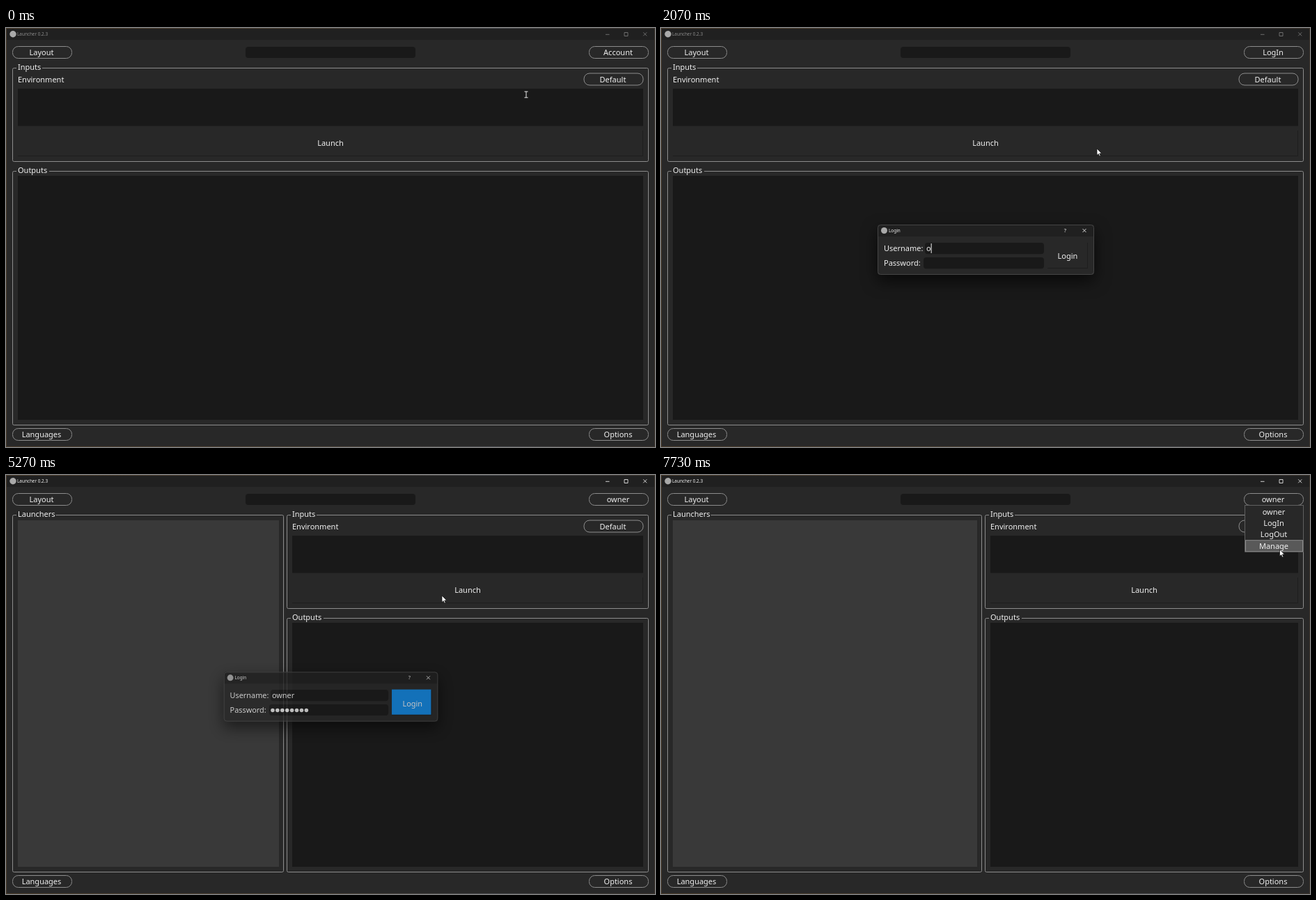
Animation of 932x601 px, one loop 8 s. Source, as an HTML page:

```html
<!DOCTYPE html>
<html lang="en">
<head>
<meta charset="utf-8">
<title>Launcher</title>
<style>
  html, body { margin: 0; height: 100%; overflow: hidden; background: #282828; }
  svg { display: block; width: 100vw; height: 100vh; cursor: none; }
  text { font: 11px "Noto Sans", "Open Sans", sans-serif; fill: #f0f0f0; }
  .mid { text-anchor: middle; }
  .small { font-size: 6.4px; }
  .bg { fill: #282828; }
  .bar { fill: #202020; }
  .field { fill: #191919; }
  .edge { fill: #1e1e1e; }
  .frame { fill: none; stroke: #8c8c8c; }
  .button { fill: #282828; stroke: #8c8c8c; }
  .glyph { fill: none; stroke: #e6e6e6; stroke-width: .9; }
  .inactive text { fill: #8a8a8a; }
  .inactive .glyph { stroke: #777; }
  .logo { fill: #a9a9a9; }
  #shadow { filter: drop-shadow(0 9px 11px rgba(0, 0, 0, .65)); }
</style>
</head>
<body>
<svg viewBox="0 0 932 601" preserveAspectRatio="none">
  <defs>
    <linearGradient id="desktop" x2="1">
      <stop offset="0" stop-color="#4a3c2c"/>
      <stop offset=".45" stop-color="#4e4336"/>
      <stop offset=".75" stop-color="#4a4c50"/>
      <stop offset="1" stop-color="#3a332c"/>
    </linearGradient>
  </defs>

  <rect class="bg" width="932" height="601"/>
  <rect class="bar" width="932" height="17"/>
  <rect x=".5" y=".5" width="931" height="600" fill="none" stroke="url(#desktop)"/>
  <g id="titlebar">
    <circle class="logo" cx="10" cy="8.7" r="4.7"/>
    <text class="small" x="16" y="11.2">Launcher 0.2.3</text>
    <path class="glyph" d="M861 9.3h5.5M888 6.5h5v5h-5zM915.2 6.3l5 5m0-5l-5 5"/>
  </g>

  <rect class="field" x="344" y="27" width="244" height="16" rx="4"/>
  <g id="buttons"></g>

  <g id="launchers">
    <rect class="frame" id="leftFrame" x="9.5" y="57.5" height="512" rx="2"/>
    <rect class="bg" x="15" y="52" width="56.5" height="10"/>
    <text x="17" y="60">Launchers</text>
    <rect id="leftList" x="17" y="65" height="497" fill="#393939"/>
  </g>

  <rect class="frame" id="inFrame" y="57.5" height="134" rx="2"/>
  <rect class="frame" id="outFrame" y="205.5" height="364" rx="2"/>
  <g id="headings">
    <rect class="bg" x="15" y="52" width="37" height="10"/>
    <text x="17" y="60">Inputs</text>
    <text x="17" y="78">Environment</text>
    <rect class="bg" x="15" y="200" width="47" height="10"/>
    <text x="17" y="207.5">Outputs</text>
  </g>
  <rect class="field" id="envBox" y="87" height="53.5"/>
  <rect class="edge" id="launchEdge" y="147" height="37"/>
  <rect class="bg" id="launchFace" y="146" height="37"/>
  <text class="mid" id="launchText" y="169">Launch</text>
  <rect class="field" id="outBox" y="212" height="350"/>
  <g id="defaultButton"></g>
  <text class="mid" id="loading" x="466" y="587.3">Loading.</text>

  <g id="menu">
    <rect class="bg" id="menuBox" x="838.5" y="43.5" width="84" stroke="#606060"/>
    <rect id="menuRow" x="839.5" width="82" height="16" fill="#595959" stroke="#8a8a8a"/>
    <g id="menuItems"></g>
  </g>

  <g id="dialog">
    <g id="shadow"><rect class="bg" x="311" y="282" width="311" height="72" rx="4"/></g>
    <path class="bar" d="M311 299v-13q0-4 4-4h303q4 0 4 4v13z"/>
    <rect x="311.5" y="282.5" width="310" height="71" rx="4" fill="none" stroke="#454545"/>
    <circle class="logo" cx="320.5" cy="290.5" r="4.5"/>
    <text class="small" x="327" y="293">Login</text>
    <text class="small mid" x="580.5" y="293.2" style="font-size:7.5px">?</text>
    <path class="glyph" d="M605.5 288l5 5m0-5l-5 5"/>
    <text x="320" y="320.2">Username:</text>
    <text x="320" y="341.3">Password:</text>
    <rect class="field" x="379" y="308" width="171" height="16.3" rx="4"/>
    <rect class="field" x="377" y="329" width="173" height="16.3" rx="4"/>
    <text id="user" x="381" y="320.2"></text>
    <g id="dots" fill="#e4e4e4"></g>
    <rect id="caret" width="1" height="14" fill="#f0f0f0"/>
    <rect class="edge" x="555" y="308" width="58" height="37"/>
    <rect id="loginFace" x="555" y="307.5" width="57" height="36.5"/>
    <text class="mid" id="loginText" x="584" y="331">Login</text>
  </g>

  <g id="pointer">
    <path id="arrow" d="M0 0V9.6L2.2 7.5 3.7 10.9 5.2 10.2 3.8 6.9H6.9Z" fill="#fff" stroke="#111" stroke-width=".7"/>
    <path id="ibeam" d="M-2.5-4.3H2.5M-2.5 4.3H2.5M0-4.3V4.3" fill="none" stroke="#e8e8e8"/>
    <g id="splitter" stroke="#111" stroke-width=".5" fill="#fff">
      <path d="M-1.8-4.8h1.2v9.6h-1.2zM.6-4.8h1.2v9.6h-1.2z"/>
      <path d="M-6.2 0l2.6-2.6v1.9h1.8v1.4h-1.8v1.9zM6.2 0l-2.6-2.6v1.9h-1.8v1.4h1.8v1.9z"/>
    </g>
  </g>
</svg>

<script>
const FPS = 15, TICKS = 120;
const USER = 'owner';
const ROW = 16.4, MENU_TOP = 44;

// Tick at which each character is typed
const USER_KEYS = [31, 35, 40, 42, 44];
const PASS_KEYS = [52, 55, 56, 58, 59, 63, 66, 69];

// Tracks: [tick, ...values]
const POINTER = [
  [0, 747, 95.5], [2, 765, 100], [4, 815, 80], [6, 862, 45], [8, 874, 37],
  [9, 878, 44], [11, 882, 60], [13, 884, 70], [16, 886, 88], [19, 882, 68],
  [22, 882, 68], [26, 626, 173], [79, 626, 173], [90, 414, 152], [98, 401, 150],
  [100, 401, 150], [101, 437, 150], [103, 463, 150], [105, 463, 150],
  [113, 878, 37], [114, 880, 41], [116, 888.5, 107]
];
const SPLIT = [[100, 398.5], [101, 409.5], [102, 437], [103, 455], [104, 460.5]];
// Opacity and scale
const DIALOG = [
  [22, 0, .9], [23, .3, .94], [24, .75, .98], [26, 1, 1],
  [78, 1, 1], [79, .8, .989], [80, .3, .95], [81, 0, .92]
];

const $ = id => document.getElementById(id);

function set(id, attrs) {
  for (const name in attrs) $(id).setAttribute(name, attrs[name]);
}

function show(id, on) {
  $(id).style.display = on ? '' : 'none';
}

function sample(track, tick) {
  const next = track.findIndex(key => key[0] > tick);
  if (next === 0) return track[0].slice(1);
  if (next < 0) return track[track.length - 1].slice(1);
  const a = track[next - 1], b = track[next];
  const u = (tick - a[0]) / (b[0] - a[0]);
  return a.slice(1).map((v, i) => v + (b[i + 1] - v) * u);
}

const typed = (keys, tick) => keys.filter(key => key <= tick).length;

function addButton(parent, x, y, label, id = '') {
  $(parent).insertAdjacentHTML('beforeend',
    `<rect class="button" x="${x + .5}" y="${y + .5}" width="85" height="17" rx="8"/>
     <text class="mid" id="${id}" x="${x + 42}" y="${y + 13}">${label}</text>`);
}

addButton('buttons', 9, 26, 'Layout', 'layout');
addButton('buttons', 837, 26, '', 'account');
addButton('buttons', 9, 574, 'Languages', 'languages');
addButton('buttons', 837, 574, 'Options', 'options');
addButton('defaultButton', 829.5, 64.5, 'Default', 'default');

$('menuItems').innerHTML = ['', 'LogIn', 'LogOut', 'Manage'].map((label, i) =>
  `<text class="mid" x="880" y="${56.6 + i * ROW}">${label}</text>`).join('');
$('dots').innerHTML = PASS_KEYS.map((_, i) =>
  `<circle cx="${382 + i * 7}" cy="337.8" r="2.8"/>`).join('');

function drawPanels(tick) {
  const open = tick >= 79;
  const split = sample(SPLIT, tick)[0];
  const left = open ? split + 5 : 9.5;
  const inner = left + 7.5, width = 915 - inner;
  show('launchers', open);
  set('leftFrame', { width: split - 9.5 });
  set('leftList', { width: split - 23.5 });
  for (const id of ['inFrame', 'outFrame']) set(id, { x: left, width: 922.5 - left });
  for (const id of ['envBox', 'outBox', 'launchEdge']) set(id, { x: inner, width });
  set('launchFace', { x: inner, width: width - 1 });
  set('launchText', { x: inner + width / 2 });
  set('headings', { transform: `translate(${left - 9.5})` });
  return inner;
}

function drawMenu(tick, y, name) {
  const open = tick >= 8 && tick < 23 || tick >= 114;
  const count = tick >= 114 ? 4 : 3;
  const row = Math.max(0, Math.min(count - 1, Math.floor((y - MENU_TOP) / ROW)));
  const items = [...$('menuItems').children];
  show('menu', open);
  items[0].textContent = name;
  items.forEach((item, i) => { item.style.display = i < count ? '' : 'none'; });
  set('menuBox', { height: count * ROW + 1 });
  set('menuRow', { y: MENU_TOP + .5 + row * ROW });
}

function drawDialog(tick) {
  const [opacity, scale] = sample(DIALOG, tick);
  const pressed = tick >= 71;
  show('dialog', opacity > 0);
  set('dialog', {
    opacity,
    transform: `translate(466.5 318) scale(${scale}) translate(-466.5 -318)`
  });

  $('user').textContent = USER.slice(0, typed(USER_KEYS, tick));
  const dots = typed(PASS_KEYS, tick);
  [...$('dots').children].forEach((dot, i) => { dot.style.display = i < dots ? '' : 'none'; });

  show('caret', !pressed);
  if (tick < 47) {
    const end = opacity > 0 ? $('user').getComputedTextLength() : 0;
    set('caret', { x: 381 + end, y: 309 });
  } else {
    set('caret', { x: 378 + dots * 7, y: 330 });
  }
  set('loginFace', { fill: pressed ? '#1287e2' : '#282828' });
  set('loginText', { x: pressed ? 585 : 584, y: pressed ? 332 : 331 });
}

function drawPointer(tick, x, y, inner) {
  const modal = tick >= 8 && tick < 79 || tick >= 114;
  const dragging = tick >= 96 && tick <= 105;
  const overText = !modal && y > 87 && y < 140.5 && x > inner && x < 915;
  show('splitter', dragging);
  show('ibeam', overText && !dragging);
  show('arrow', !overText && !dragging);
  set('pointer', { transform: `translate(${x} ${y})` });
}

function render(ms) {
  // The small bias absorbs rounding at tick boundaries
  const tick = Math.floor(ms * FPS / 1000 + .1) % TICKS;
  const [x, y] = sample(POINTER, tick);
  const name = tick < 23 ? 'Account' : tick < 78 ? 'LogIn' : USER;
  const active = tick >= 8 && tick < 23 || tick >= 79;
  $('titlebar').setAttribute('class', active ? '' : 'inactive');
  $('account').textContent = name;
  show('loading', tick === 78);
  const inner = drawPanels(tick);
  drawMenu(tick, y, name);
  drawDialog(tick);
  drawPointer(tick, x, y, inner);
}

let start;
function loop(now) {
  start ??= now;
  render(now - start);
  requestAnimationFrame(loop);
}
render(0);
requestAnimationFrame(loop);
</script>
</body>
</html>
```
